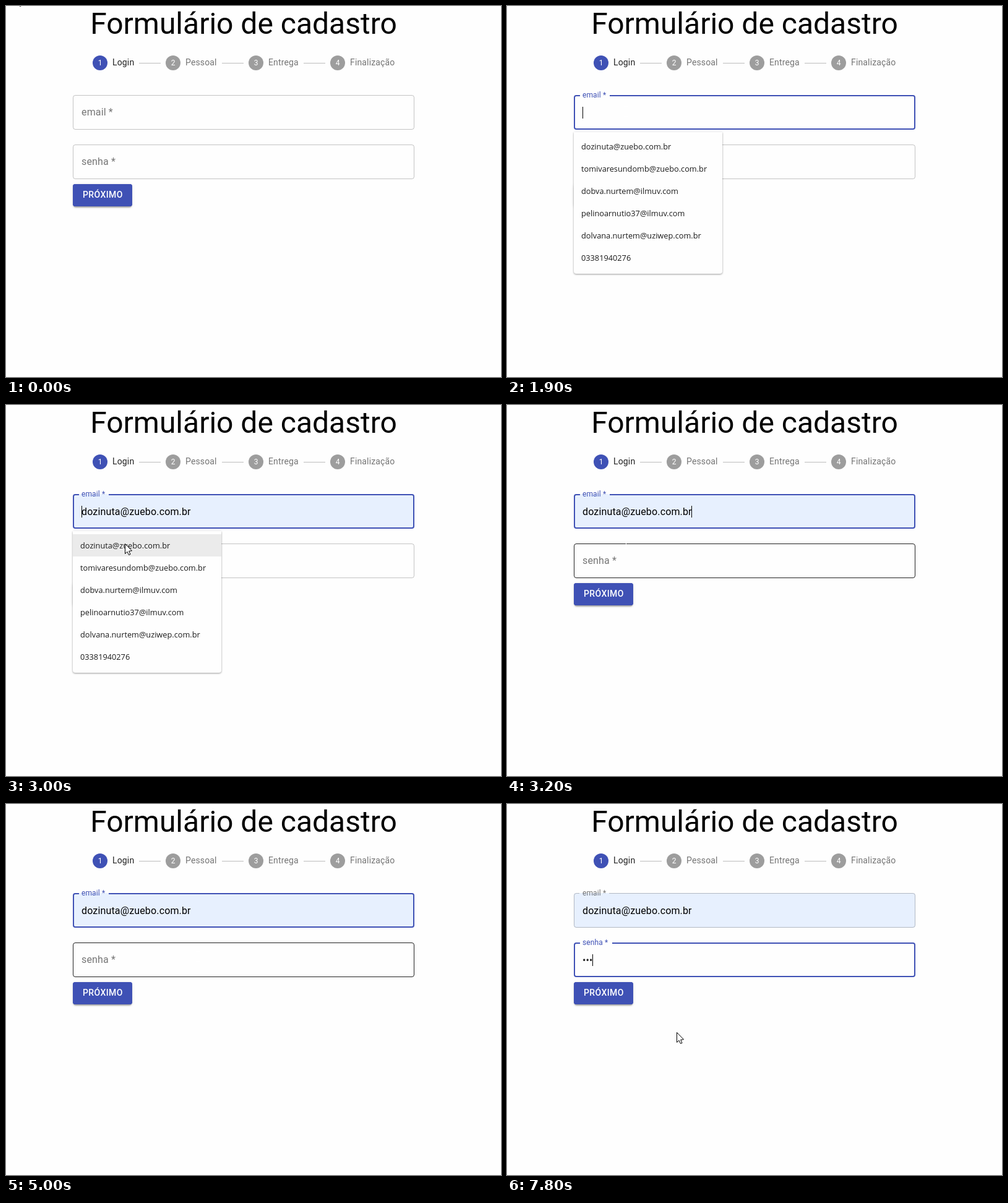
An HTML page with a canvas for the animation above (8000 ms loop, 800 by 600 pixels).

```html
<!DOCTYPE html>
<html lang="pt-BR">
<head>
<meta charset="utf-8">
<title>Formulário de cadastro</title>
<style>
  html, body { margin: 0; width: 100%; height: 100%; overflow: hidden; background: #fefefe; }
  canvas { display: block; }
</style>
</head>
<body>
<canvas id="stage" width="800" height="600"></canvas>
<script>
const ctx = document.getElementById('stage').getContext('2d');
const LOOP = 8000, STEP = 100;
const PAGE = '#fefefe', PRIMARY = '#3f51b5', FILL = '#e7f0fe';
const DARK = 'rgba(0,0,0,.87)', MUTED = 'rgba(0,0,0,.54)';
const UI = 'Roboto, sans-serif', MENU = '"Open Sans", sans-serif';

const EMAIL = 'dozinuta@zuebo.com.br';
const OPTIONS = [
  EMAIL,
  'tomivaresundomb@zuebo.com.br',
  'dobva.nurtem@ilmuv.com',
  'pelinoarnutio37@ilmuv.com',
  'dolvana.nurtem@uziwep.com.br',
  '03381940276'
];

// label, circle centre x, connector start x
const STEPS = [['Login', 152, 215], ['Pessoal', 270, 349], ['Entrega', 404, 481], ['Finalização', 536]];

// time, x, y, shape
const POINTER = [
  [0, 16, -18, 'arrow'], [500, 1, 4, 'arrow'], [600, 14, 26, 'arrow'],
  [700, 48, 62, 'arrow'], [800, 96, 104, 'arrow'], [900, 150, 152, 'beam'],
  [1000, 192, 170, 'beam'], [2900, 199, 212, 'arrow'], [3000, 192, 224, 'arrow'],
  [3200, 192, 224, 'beam'], [3500, 212, 190, 'beam'], [3600, 232, 188, 'beam'],
  [3700, 250, 187, 'beam'], [3900, 278, 179, 'beam'], [4000, 302, 171, 'beam'],
  [4100, 316, 168, 'beam'], [4600, 314, 168, 'beam'], [4800, 314, 188, 'beam'],
  [4900, 312, 210, 'arrow'], [5000, 310, 246, 'beam'], [7700, 277, 330, 'arrow'],
  [7800, 274, 369, 'arrow']
];

// time, x, y (no position: hidden)
const CARET = [
  [0], [1700, 122, 163], [2400], [2900, 122, 163], [3200, 298, 163], [3700],
  [4300, 298, 163], [4800], [5300, 122, 243], [5900], [6400, 127, 243],
  [6600, 133, 243], [6900, 138, 243], [7400], [7800, 138, 243]
];

const TYPED = [[0, 0], [6400, 1], [6600, 2], [6900, 3]];

const during = (t, from, to) => t >= from && t < to;
const at = (list, t) => list.reduce((found, row) => row[0] <= t ? row : found);

function text(str, x, y, size, color, { weight = 400, family = UI, spacing = 0, align = 'left' } = {}) {
  ctx.font = `${weight} ${size}px ${family}`;
  ctx.letterSpacing = spacing + 'px';
  ctx.textAlign = align;
  ctx.fillStyle = color;
  ctx.fillText(str, x, y);
}

function box(x, y, w, h, r) {
  ctx.beginPath();
  ctx.roundRect(x, y, w, h, r);
}

function shadow(color, blur, dy) {
  ctx.shadowColor = color;
  ctx.shadowBlur = blur;
  ctx.shadowOffsetY = dy;
}

function header() {
  text('Formulário de cadastro', 384, 45, 48, '#000', { align: 'center' });
  STEPS.forEach(([label, x, line], i) => {
    ctx.fillStyle = i ? '#9d9d9d' : PRIMARY;
    ctx.beginPath();
    ctx.arc(x, 92, 12, 0, 7);
    ctx.fill();
    text(i + 1, x, 96, 12, '#fff', { align: 'center' });
    text(label, x + 20, 96, 14, i ? MUTED : DARK, { spacing: .15 });
    if (line) {
      ctx.fillStyle = '#bdbdbd';
      ctx.fillRect(line, 92, 35, 1);
    }
  });
}

function button() {
  ctx.save();
  ctx.fillStyle = PRIMARY;
  box(108, 288, 96, 36, 4);
  shadow('rgba(0,0,0,.12)', 5, 1);
  ctx.fill();
  shadow('rgba(0,0,0,.3)', 2, 2);
  box(109, 289, 94, 35, 4);
  ctx.fill();
  ctx.restore();
  ctx.fillStyle = PRIMARY;
  box(108, 288, 96, 36, 4);
  ctx.fill();
  text('PRÓXIMO', 124, 310, 14, '#fff', { weight: 500, spacing: .4 });
}

function field(y, label, gap, { focus, hover, filled, shrink }) {
  if (filled) {
    ctx.fillStyle = FILL;
    box(108, y, 552, 56, 4);
    ctx.fill();
  }
  ctx.save();
  if (shrink > .3) {
    ctx.beginPath();
    ctx.rect(0, 0, 800, 600);
    ctx.rect(focus ? 118 : 117, y - 1, gap, 4);
    ctx.clip('evenodd');
  }
  const w = focus ? 2 : 1;
  ctx.lineWidth = w;
  ctx.strokeStyle = focus ? PRIMARY : hover ? DARK : 'rgba(0,0,0,.23)';
  box(108 + w / 2, y + w / 2, 552 - w, 56 - w, 4 - w / 2);
  ctx.stroke();
  ctx.restore();

  const scale = 1 - .25 * shrink;
  ctx.save();
  ctx.translate(122, y + 33 - 29 * shrink);
  ctx.scale(scale, scale);
  text(label + ' *', 0, 0, 16, focus ? PRIMARY : MUTED, { spacing: .15 });
  ctx.restore();
}

function menu(active) {
  ctx.save();
  shadow('rgba(0,0,0,.4)', 3, 1);
  ctx.fillStyle = PAGE;
  box(108, 204, 240, 229, [0, 0, 4, 4]);
  ctx.fill();
  ctx.restore();
  if (active) {
    ctx.fillStyle = '#ebebeb';
    ctx.fillRect(108, 209, 240, 36);
  }
  OPTIONS.forEach((name, i) => text(name, 120, 232 + 36 * i, 12.75, '#1c1c1c', { family: MENU }));
}

function pointer([, x, y, shape]) {
  if (shape === 'beam') {
    ctx.fillStyle = '#fff';
    ctx.fillRect(x, y - 7, 1, 15);
    for (const end of [y - 8, y + 8]) {
      ctx.fillRect(x - 3, end, 3, 1);
      ctx.fillRect(x + 1, end, 3, 1);
    }
    return;
  }
  ctx.save();
  ctx.translate(x + .5, y + .5);
  ctx.beginPath();
  [[0, 0], [0, 16], [3.5, 12.8], [6, 18], [8.5, 17], [6.2, 11.8], [11, 11.3]]
    .forEach(p => ctx.lineTo(...p));
  ctx.closePath();
  ctx.fillStyle = '#fff';
  ctx.strokeStyle = '#000';
  ctx.lineWidth = 1;
  ctx.fill();
  ctx.stroke();
  ctx.restore();
}

function shrinkFrom(t, start) {
  const p = t < start ? 0 : Math.min(1, (t - start + 50) / 200);
  return 1 - (1 - p) ** 3;
}

function draw(t) {
  ctx.fillStyle = PAGE;
  ctx.fillRect(0, 0, 800, 600);
  header();
  button();

  const filled = t >= 3000;
  field(144, 'email', 48, {
    focus: during(t, 1700, 5300), hover: during(t, 900, 1700),
    filled, shrink: shrinkFrom(t, 1700)
  });
  field(224, 'senha', 52, {
    focus: t >= 5300, hover: during(t, 3200, 3500) || during(t, 5000, 5300),
    shrink: shrinkFrom(t, 5300)
  });
  if (filled) text(EMAIL, 122, 178, 16, '#000', { spacing: .15 });
  text('•'.repeat(at(TYPED, t)[1]), 122, 258, 16, DARK, { spacing: .15 });

  const [, cx, cy] = at(CARET, t);
  if (cx) {
    ctx.fillStyle = '#000';
    ctx.fillRect(cx, cy, 1, 19);
  }
  if (during(t, 1800, 3200)) menu(filled);
  pointer(at(POINTER, t));
}

const start = performance.now();
function tick() {
  const t = (performance.now() - start) % LOOP;
  draw(Math.floor(t / STEP) * STEP);
  requestAnimationFrame(tick);
}
tick();
</script>
</body>
</html>
```
